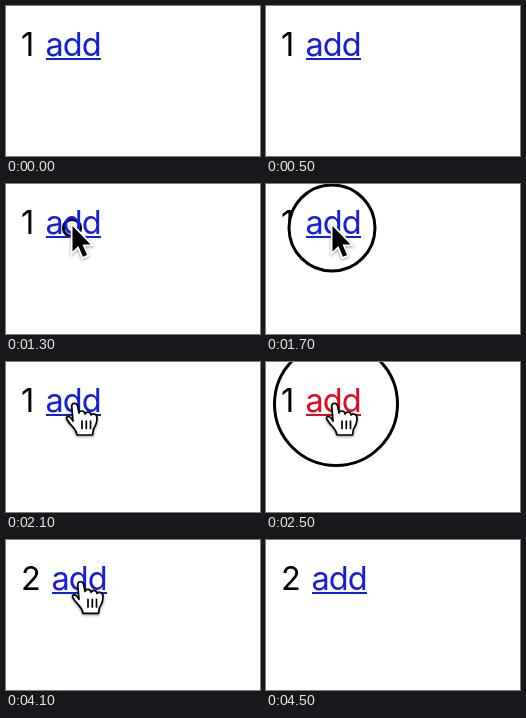
These frames come from a looping animation (254 by 150 pixels, 4600 ms). An HTML page:

```html
<!DOCTYPE html>
<html lang="en">
<head>
<meta charset="utf-8">
<title>Click counter</title>
<style>
  html, body { margin: 0; height: 100%; overflow: hidden; background: #fff; }
  svg { display: block; width: 100vw; height: 100vh; }
  text { font: 32.5px Inter, "Liberation Sans", sans-serif; letter-spacing: -.03em; }
  #arrow, #hand { filter: drop-shadow(0 1.5px 1.5px rgba(0, 0, 0, .4)); }
</style>
</head>
<body>
<svg viewBox="0 0 254 150">
  <text id="count" x="15" y="50.3">1</text>
  <circle id="ring" stroke="#000" stroke-width="3"/>
  <g id="link">
    <text x="-.5" y="50.3">add</text>
    <path d="M0 52h55v2H0z"/>
  </g>
  <path id="arrow" d="M0 0V25.5L5.8 20 10.4 30.8 14.6 29 10 18.4H18Z"
    stroke="#fff" stroke-width="3.6" paint-order="stroke"/>
  <g id="hand" stroke="#000" stroke-width="1.7" stroke-linejoin="round" stroke-linecap="round">
    <path fill="#fff" d="M67 59L65.8 45Q65.5 41.3 68.5 41.3Q71 41.3 71.6 44L73 51Q73.5 49 76 49
      Q78.5 49 79 52Q80 50 82 50Q85 50.3 85 53Q86 51.5 88 52Q91 52.5 91 56Q91 62 87.5 67
      L86.5 73H71Q70.5 69 66.5 64.5Q63 61 61 57.5Q59.5 55 62 54.5Q64.5 54.5 67 59Z"/>
    <path d="M76 59v7.5M80.3 59v7.5M84.5 59v7.5"/>
  </g>
</svg>
<script>
const LOOP = 4600, STEP = 100;
const $ = id => document.getElementById(id);
const set = (el, attrs) => {
  for (const key in attrs) el.setAttribute(key, attrs[key]);
};
const move = (el, x, y) => set(el, { transform: `translate(${x} ${y})` });
const show = (el, on) => { el.style.display = on ? "" : "none"; };

function ringAt(t) {
  if (t >= 1300 && t < 1800) {
    return { cx: 66, cy: 44, r: 43 * (t - 1200) / 500, fill: "#fff" };
  }
  const press = Math.min(1, (t - 2300) / 200);
  const release = Math.min(1, (3100 - t) / 400);
  const size = Math.max(0, Math.min(press, release));
  return size && { cx: 70, cy: 42, r: 61.5 * size, fill: "none" };
}

function draw(t) {
  const clicked = t >= 2800;
  $("count").textContent = clicked ? 2 : 1;
  move($("link"), clicked ? 46 : 40, 0);
  set($("link"), { fill: t >= 2400 && !clicked ? "#e10a1e" : "#141edc" });

  const ring = ringAt(t);
  show($("ring"), ring);
  if (ring) set($("ring"), ring);

  // The arrow slows down as it reaches the link.
  const away = Math.max(0, (1200 - t) / 500) ** 2.15;
  show($("arrow"), t >= 700 && t < 2100);
  move($("arrow"), 66.5 + 57 * away, 42 + 81 * away);

  // The hand speeds up as it leaves, first sideways and then down.
  const leave = Math.max(0, (t - 4000) / 400) ** 2.35;
  show($("hand"), t >= 2100 && t < 4500);
  move($("hand"), 156 * leave, 42 * leave ** 1.4);
}

const start = performance.now();
function tick() {
  const t = (performance.now() - start) % LOOP;
  draw(Math.floor(t / STEP) * STEP);
  requestAnimationFrame(tick);
}
tick();
</script>
</body>
</html>
```
